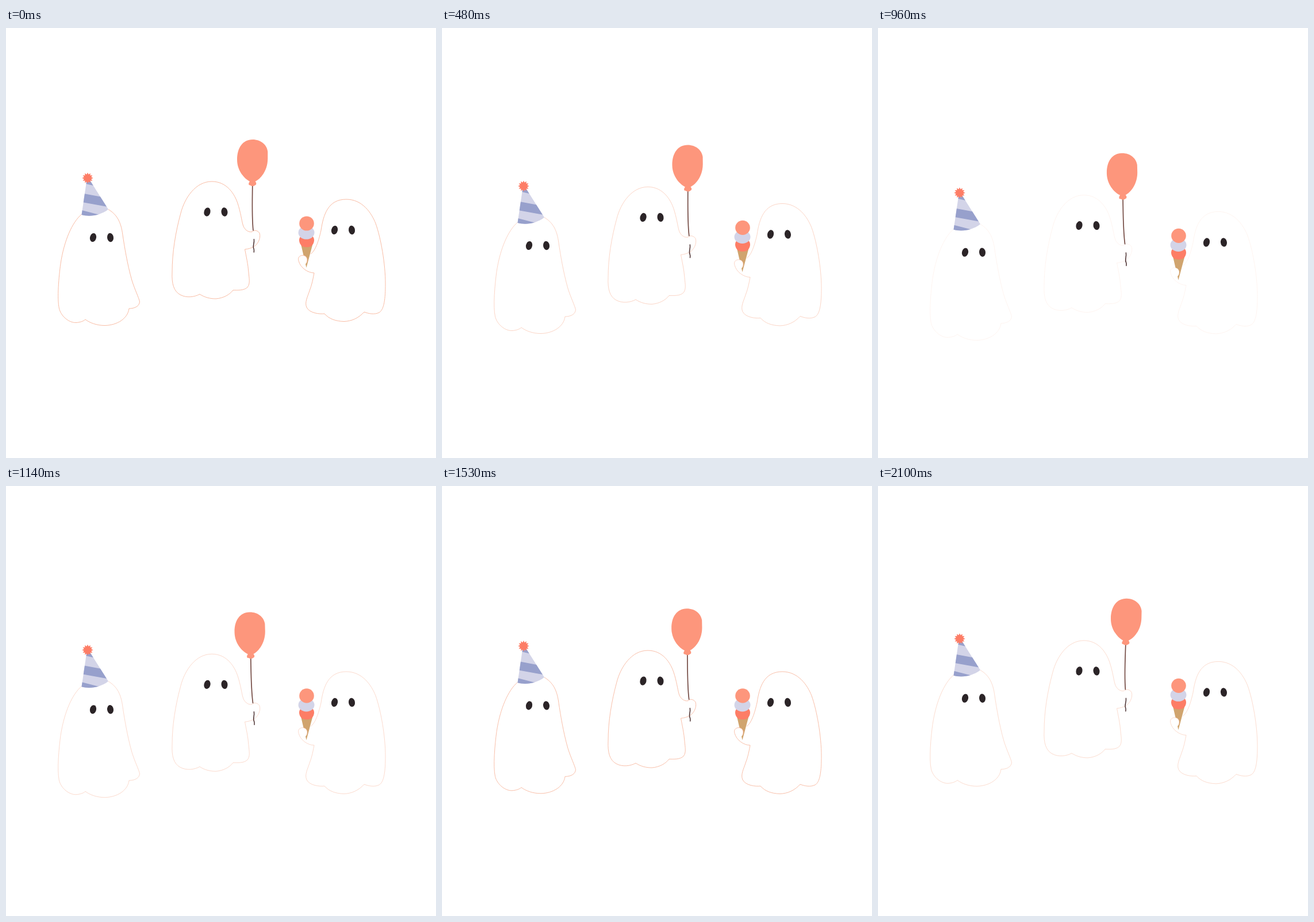
An HTML page that plays this animation: 748x748 px, repeating every 2130 ms.

```html
<!DOCTYPE html>
<html lang="en">
<head>
<meta charset="utf-8">
<title>Ghost party</title>
<style>
  html, body { margin: 0; width: 100%; height: 100%; overflow: hidden; background: #fff; }
  svg { display: block; width: 100vw; height: 100vh; }
  .body { fill: #fff; }
  .rim { fill: none; stroke: #f8b9a0; stroke-width: 1; stroke-linejoin: round; }
  .eyes { fill: #2b2427; }
  .coral { fill: #fd967c; }
  .red { fill: #fd7d66; }
  .pale { fill: #d3d4e8; }
  .blue { fill: #97a0cc; }
  .cone { fill: #d0a46e; }
  .string { fill: none; stroke: #754c45; stroke-width: 1.7; stroke-linecap: round; }
  .tail { stroke: #4b3030; stroke-width: 1.5; }
</style>
</head>
<body>
<svg viewBox="0 0 748 748">
  <defs>
    <g id="eyes" class="eyes">
      <ellipse cx="-15" rx="5.5" ry="7.7" transform="rotate(14 -15 0)"/>
      <ellipse cx="15" rx="5.5" ry="7.7" transform="rotate(-8 15 0)"/>
    </g>
    <path id="hat" d="M140.5 264 L131.5 325 C146 329 164 326 178 315.5 L146 265Z"/>
    <clipPath id="hatClip"><use href="#hat"/></clipPath>
    <path id="hatBody" d="M131.5 324 C115 338 101 370 95 410 C92 432 88.5 470 92.5 488 C96 502 110 513 122 512.5 C129 512 135 510 138 507 C146 513 158 517.5 172 517.5 C194 517 212 505 214 488 C224 488 232 484 232.5 476 C231 469 224 455 219 439 C211 411 206 380 203 360 C200 336 192 324 178 315.5"/>
    <path id="balloonBody" d="M412 342 C410 335 408 320 403 305 C398 290 385 267 358 267 C330 267 311 295 304 322 C295 355 289 390 289 425 C288 445 292 458 303 464 C314 470 328 468 337 463 C346 469 356 471 365 471 C378 470 389 464 395 456 C403 456 414 457 420 451 C425 445 423 436 422 425 C421 411 418 398 415.5 385 C421 384.5 426 383 430 381 C437 378 444 366 441 357 C438 351.5 431 351 428 354.5 C421 356 414 350 412 342Z"/>
    <path id="coneBody" d="M530 393 C538 388 544 370 548 352 C552 325 560 298 592 298 C620 298 636 322 643 340 C652 365 660 410 660 445 C660 470 658 490 649 495 C641 499 631 497 623 494 C613 505 601 510 588 510.5 C573 510 562 506 554 497 C545 498 528 496 523 486 C519 477 525 467 528 457 C532 447 534 437 536 426 C525 426 512 417 509 405"/>
  </defs>

  <g id="hatGhost">
    <use href="#hatBody" class="body"/>
    <use href="#hatBody" class="rim"/>
    <use href="#hat" class="pale"/>
    <g class="blue" clip-path="url(#hatClip)">
      <path d="M130 260 H160 V276 L130 269Z"/>
      <path d="M130 287 L180 296.5 V311.5 L130 302.5Z"/>
      <path d="M130 316.5 L165 325.5 V335 H130Z"/>
    </g>
    <path id="pom" class="red" transform="translate(142 261)"/>
    <use href="#eyes" x="166.5" y="364.5"/>
  </g>

  <g id="balloonGhost">
    <use href="#balloonBody" class="body"/>
    <use href="#balloonBody" class="rim"/>
    <use href="#eyes" x="365" y="320"/>
    <g id="balloon">
      <path class="string" d="M428.8 273 C428.5 300 427.5 328 430 352"/>
      <path class="string tail" d="M431.4 367.5 C432.5 375 428.5 379 431 384 C432 387 431.3 388 431.3 390"/>
      <path class="coral" d="M429 194 C412 194 402 208 402 229 C402 247 413 261 424 267 C421 271 422 274 425 273.5 C427 275.5 431 275.5 433 273.5 C436 273 436 269 433.5 267 C444 262 455.3 247 455.3 227 V215 C454 203 443 194 429 194Z"/>
    </g>
  </g>

  <g id="coneGhost">
    <use href="#coneBody" class="body"/>
    <use href="#coneBody" class="rim"/>
    <path class="cone" d="M513 376 H533.5 L522.5 417Z"/>
    <path class="red" d="M510 369 A13 11 0 0 1 536 369 C536 374 533 378 530 380 Q523 382.5 516 380 C513 378 510 374 510 369Z"/>
    <ellipse class="pale" cx="522.5" cy="356" rx="14" ry="11.5"/>
    <ellipse class="coral" cx="523" cy="340" rx="12.8" ry="12.6"/>
    <path class="body" d="M509 405 C507 398 512 395.3 517 395.5 C523 396.5 525.5 402 523 408 L520 412Z"/>
    <path class="rim" d="M509 405 C507 398 512 395.3 517 395.5 C523 396.5 525.5 402 523 408"/>
    <use href="#eyes" x="586.5" y="351.5"/>
  </g>
</svg>
<script>
const LOOP = 2130, STEP = 30;
const $ = id => document.getElementById(id);

// Each track lists [time, value] stops.
const tracks = {
  hat: [[73, 0], [849, 26], [2589, 0]],
  balloon: [[0, 0], [1150, 25.3], [2300, 0]],
  cone: [[0, 0], [1350, 26.5], [2510, 0]],
  sway: [[0, 0], [1200, -1.85], [2300, 1.5]],
  rim: [[0, 0.95], [480, 0.6], [750, 0.4], [960, 0.16], [1320, 0.9], [1800, 0.9], [2100, 0.5]]
};

const ease = u => (1 - Math.cos(Math.PI * u)) / 2;
const linear = u => u;

function at(track, t, curve = ease) {
  if (t <= track[0][0]) return track[0][1];
  for (let i = 1; i < track.length; i++) {
    const [t0, v0] = track[i - 1], [t1, v1] = track[i];
    if (t <= t1) return v0 + (v1 - v0) * curve((t - t0) / (t1 - t0));
  }
  return track[track.length - 1][1];
}

function star(points, outer, inner) {
  const corners = Array.from({ length: points * 2 }, (_, i) => {
    const r = i % 2 ? inner : outer, a = Math.PI * (i / points - 0.5);
    return (r * Math.cos(a)).toFixed(2) + ' ' + (r * Math.sin(a)).toFixed(2);
  });
  return 'M' + corners.join('L') + 'Z';
}
$('pom').setAttribute('d', star(12, 9.6, 6.4));

const rims = document.querySelectorAll('.rim');

function draw(t) {
  for (const name of ['hat', 'balloon', 'cone'])
    $(name + 'Ghost').setAttribute('transform', `translate(0 ${at(tracks[name], t)})`);
  $('balloon').setAttribute('transform', `rotate(${at(tracks.sway, t)} 430.5 368)`);
  const strength = at(tracks.rim, t, linear);
  rims.forEach(rim => rim.setAttribute('stroke-opacity', strength));
}

const start = performance.now();
function tick() {
  const t = Math.max(0, performance.now() - start) % LOOP;
  draw(Math.floor(t / STEP) * STEP);
  requestAnimationFrame(tick);
}
draw(0);
requestAnimationFrame(tick);
</script>
</body>
</html>
```
